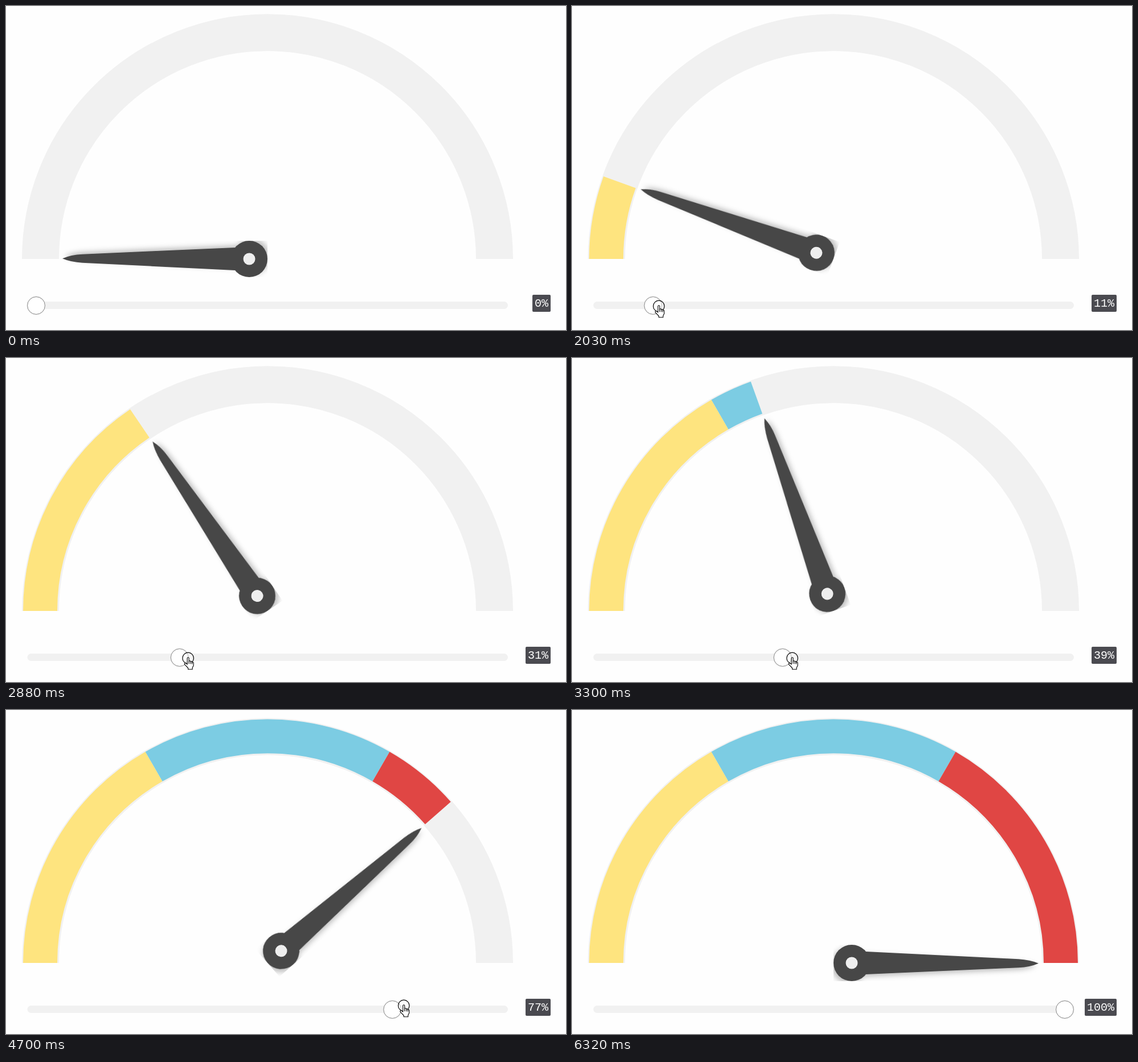
Animation of 983 by 570 pixels, one loop 6.69 s. Source, as an HTML page:

```html
<!DOCTYPE html>
<html lang="en">
<head>
<meta charset="utf-8">
<title>Gauge</title>
<style>
  html, body { margin: 0; width: 100%; height: 100%; overflow: hidden; background: #fefefe; }
  svg { display: block; width: 983px; height: 570px; }
  .zone { fill: none; stroke-width: 60; }
  .value { font: 20px "Liberation Mono", "Courier New", monospace; fill: #fff; text-anchor: end; }
  .pointer { fill: #fff; stroke: #000; stroke-width: 1.1; stroke-linejoin: round; }
</style>
</head>
<body>
<svg viewBox="0 0 983 570">
  <defs>
    <clipPath id="box"><rect x="-362" y="-32" width="362" height="64"/></clipPath>
    <filter id="shade" filterUnits="userSpaceOnUse" x="-390" y="-60" width="420" height="120">
      <feDropShadow dx="4" dy="-4" stdDeviation="5" flood-color="#000" flood-opacity=".25"/>
    </filter>
  </defs>

  <path d="M60.5 445a398.5 398.5 0 0 1 797 0" fill="none" stroke="#f1f1f1" stroke-width="65"/>
  <path class="zone" stroke="#fee47f" pathLength="3" d="M60 445a399 399 0 0 1 798 0"/>
  <path class="zone" stroke="#7ccce3" pathLength="3" d="M60 445a399 399 0 0 1 798 0"/>
  <path class="zone" stroke="#e04644" pathLength="3" d="M60 445a399 399 0 0 1 798 0"/>

  <g id="needle">
    <g clip-path="url(#box)">
      <g filter="url(#shade)">
        <path fill="#474747" d="M-360 -.8Q-345 -7.4 -325 -8.3L-57 -20H-32V20H-57L-325 6.7Q-345 5.6 -360 -.8Z"/>
        <circle cx="-32" r="32" fill="#474747"/>
      </g>
      <circle cx="-32" r="10.5" fill="#eee"/>
    </g>
  </g>

  <rect x="37.5" y="520" width="843.5" height="13" rx="6.5" fill="#f1f1f1"/>
  <g id="thumb">
    <circle r="16.4" fill="#e4e4e4"/>
    <circle r="15.4" fill="#fff" stroke="#8c8c8c"/>
  </g>

  <rect id="badge" y="508" height="30" rx="2" fill="#4a4a50"/>
  <text id="value" class="value" x="952" y="529"></text>

  <g id="cursor">
    <circle id="press" r="9.8" fill="#fff" fill-opacity=".4" stroke="#000" stroke-width="1.2"/>
    <g id="hand" class="pointer" transform="translate(-7 -2)">
      <path d="M5.5 13V2.2a1.5 1.5 0 0 1 3 0V8a1.5 1.5 0 0 1 3 .5a1.4 1.4 0 0 1 2.6 .8a1.4 1.4 0 0 1 2.4 1V15l-2 4v2.7H7v-2.2L1 13.2q-1-2.2 1-2.5q1.5 .2 3.5 2.3z"/>
      <path fill="none" d="M8.5 8v4M11.5 8.5v3.8M14.1 9.3v3.2"/>
    </g>
    <path id="arrow" class="pointer" transform="scale(1.1)" d="M.5 .5V17l4-3.8 2.6 6 2.4-1-2.6-5.9h5.3z"/>
  </g>
</svg>
<script>
const LOOP = 6690, START = 246, TICK = 138;
const $ = id => document.getElementById(id);
const zones = document.querySelectorAll('.zone');

// Key points of the drag: [tick, percent]
const drag = [[7, 0], [9, 2], [16, 23], [22, 39], [27, 54], [32, 77], [36, 92], [38, 98], [40, 100]];

// Key points of the cursor: [tick, distance ahead of the thumb, y]
const path = [
  [0, 25, 556], [3, 3, 528], [7, 3, 528], [9, 8, 528], [22, 17, 528],
  [27, 14, 527], [32, 20, 520], [38, 19, 525], [42, 35, 534], [43, 60, 556]
];

const clamp = (v, lo, hi) => Math.min(hi, Math.max(lo, v));
const show = (el, on) => el.setAttribute('visibility', on ? 'visible' : 'hidden');
const place = (el, x, y, angle = 0) =>
  el.setAttribute('transform', `translate(${x} ${y}) rotate(${angle})`);

// Linear interpolation between key points, held at both ends
function mix(points, k) {
  const at = clamp(points.findIndex(p => p[0] > k), -1, points.length);
  if (at <= 0) return points.at(at).slice(1);
  const [a, b] = [points[at - 1], points[at]];
  const f = (k - a[0]) / (b[0] - a[0]);
  return a.slice(1).map((v, i) => v + (b[i + 1] - v) * f);
}

function draw(now) {
  // The picture changes once per tick and holds in between
  const k = Math.floor((now % LOOP - START) / TICK);
  const percent = Math.round(mix(drag, k)[0]);
  const thumbX = 53 + 8.12 * percent;

  zones.forEach((zone, i) => {
    zone.setAttribute('stroke-dasharray', `${clamp(percent * 3 / 100 - i, 0, 1)} 9`);
    zone.setAttribute('stroke-dashoffset', -i);
  });
  place($('needle'), 459, 445, percent * 1.8);
  place($('thumb'), thumbX, 527);

  const label = percent + '%';
  const width = label.length * 12 + 8;
  $('value').textContent = label;
  $('badge').setAttribute('x', 956 - width);
  $('badge').setAttribute('width', width);

  const seen = k >= 0 && k < 44;
  const onSlider = k >= 2 && k < 42;
  const [lead, y] = mix(path, k);
  place($('cursor'), thumbX + lead, y);
  show($('hand'), onSlider);
  show($('arrow'), seen && !onSlider);
  show($('press'), k >= 6 && k < 41);
}

const start = performance.now();
function tick() {
  draw(performance.now() - start);
  requestAnimationFrame(tick);
}
tick();
</script>
</body>
</html>
```
